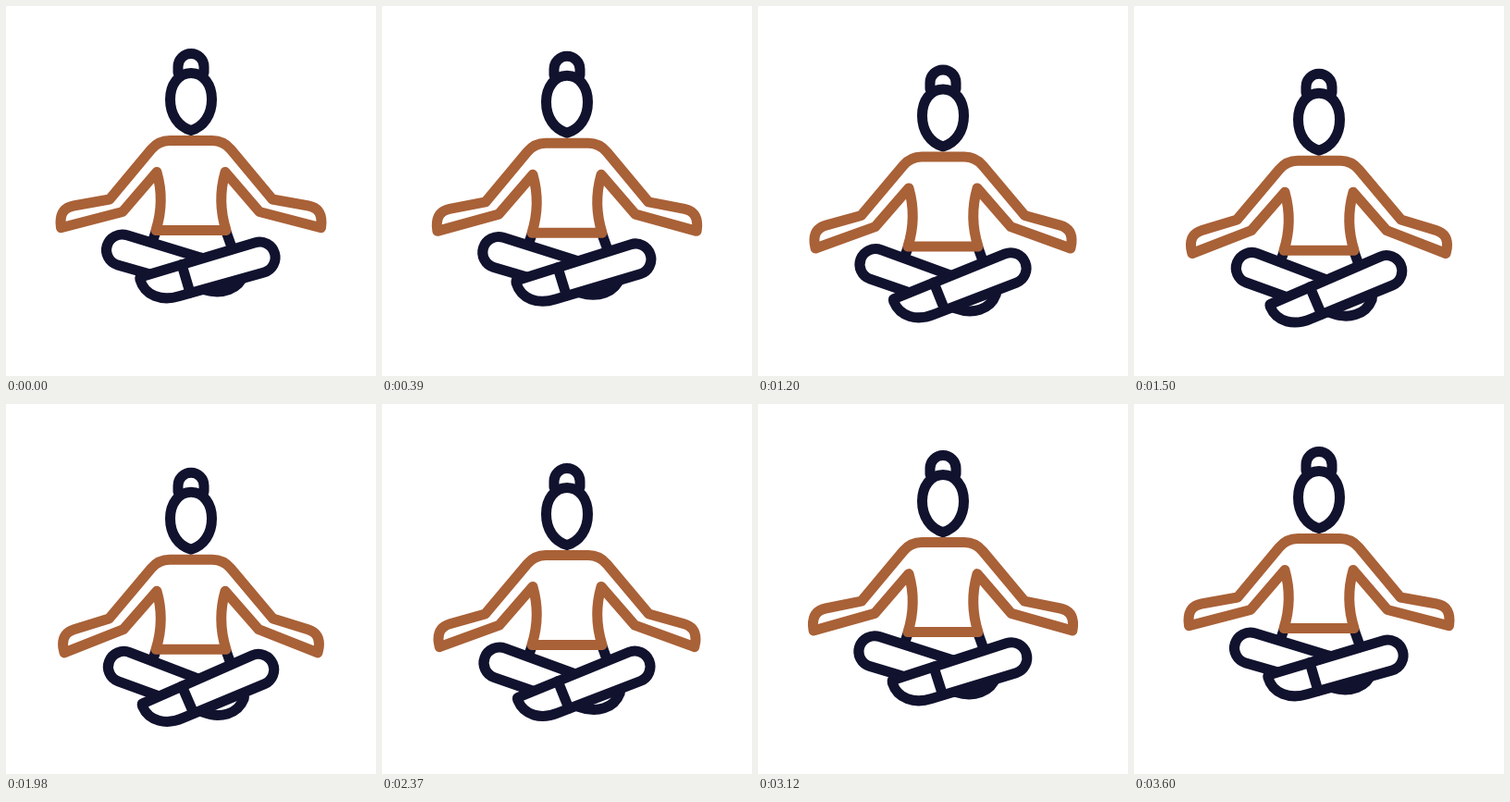
Recreate the animation shown at these times as an HTML page. Size 400 by 400 pixels, loop 3.63 s.

```html
<!DOCTYPE html>
<html lang="en">
<head>
<meta charset="utf-8">
<title>Meditation</title>
<style>
  html, body { margin: 0; width: 100%; height: 100%; overflow: hidden; background: #fff; }
  svg { display: block; width: 100vw; height: 100vh; }
  svg * { stroke-width: 11; stroke-linecap: round; stroke-linejoin: round; }
  .navy { stroke: #11122e; fill: none; }
  .leg { fill: #fff; }
  .brown { stroke: #a96137; fill: none; }
</style>
</head>
<body>
<svg viewBox="0 0 400 400">
  <defs>
    <!-- Knee centre sits at the origin -->
    <g id="leg">
      <path class="navy leg" d="M-128.5 22 L-4.5 -15.3 A16.800 16.800 0 0 1 5 17 L-87 42.8 C-106 48.5 -124 42 -129 25 Q-129.500 22.300 -128.5 22 Z"/>
      <path class="navy" d="M-84 8.500 L-75 39"/>
    </g>
  </defs>
  <path id="hips" class="navy" d="M162 244 L157.500 257 M238 244 L243 258"/>
  <use id="back" href="#leg"/>
  <use id="front" href="#leg"/>
  <g id="head" class="navy">
    <path d="M186 72 V65.500 A14 14 0 0 1 214 65.500 V72"/>
    <path d="M200 72.500 C213.500 72.500 222.500 85 222.500 101 C222.500 118 213.500 130.500 200 134.500 C186.500 130.500 177.500 118 177.500 101 C177.500 85 186.500 72.500 200 72.500 Z"/>
  </g>
  <path id="torso" class="brown"/>
</svg>
<script>
  const STEP = 30, HALF = 1800, LOOP = 3630;
  const DROP = 23.5, HAND_TURN = 7.2;
  const ELBOW = [113, 214];
  const el = id => document.getElementById(id);
  const hips = el('hips'), back = el('back'), front = el('front');
  const head = el('head'), torso = el('torso');

  const ease = p => p * p * (3 - 2 * p);
  const move = (node, value) => node.setAttribute('transform', value);

  function turn([x, y], deg) {
    const a = deg * Math.PI / 180, c = Math.cos(a), s = Math.sin(a);
    const dx = x - ELBOW[0], dy = y - ELBOW[1];
    return [ELBOW[0] + dx * c + dy * s, ELBOW[1] + dy * c - dx * s];
  }

  // Half of the shirt; the other half is its mirror image
  function shirt(u, mirror) {
    const fix = ([x, y]) => `${(mirror ? 400 - x : x).toFixed(2)} ${y.toFixed(2)} `;
    const still = (...pts) => pts.map(fix).join('');
    const hand = (...pts) => pts.map(p => fix(turn(p, HAND_TURN * u))).join('');
    return 'M' + still([200, 145.5], [177, 145.5]) +
      'C' + still([169, 145.5], [162, 149], [157, 155]) +
      'L' + hand([112, 209], [73, 216]) +
      'C' + hand([63, 218], [59, 224], [59, 234]) +
      'L' + hand([59.5, 239.7], [126, 222.5]) +
      'L' + still([163, 179.5]) +
      'Q' + still([172, 211], [162, 242.5]) +
      'L' + still([200, 242.5]);
  }

  function pose(time) {
    const t = Math.floor(time % LOOP / STEP) * STEP;
    const u = ease(1 - Math.abs(1 - t / HALF));
    const drop = `translate(0 ${DROP * u})`;
    [hips, head, torso].forEach(node => move(node, drop));
    torso.setAttribute('d', shirt(u, false) + shirt(u, true));
    move(back, `translate(${126 + 2 * u} ${263 + 21 * u}) scale(-1.02 1) rotate(${-0.6 - 4.2 * u})`);
    move(front, `translate(${274 - 1.5 * u} ${271 + 15.8 * u}) rotate(${-7.2 * u})`);
  }

  const start = performance.now();
  function tick() {
    pose(performance.now() - start);
    requestAnimationFrame(tick);
  }
  tick();
</script>
</body>
</html>
```
